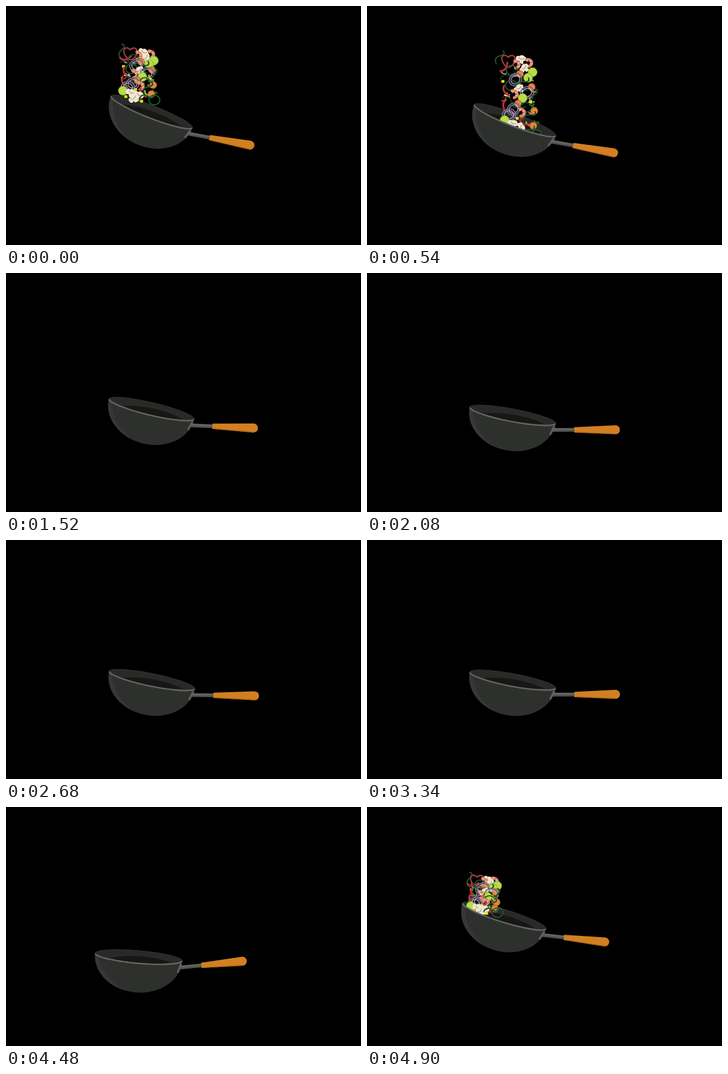
Write an HTML page that moves like this. It is 640 by 432 pixels and loops after 4920 ms.

```html
<!DOCTYPE html>
<html lang="en">
<head>
<meta charset="utf-8">
<title>Wok toss</title>
<style>
  html, body { margin: 0; height: 100%; overflow: hidden; background: #000; }
  svg { display: block; width: 100vw; height: 100vh; }
</style>
</head>
<body>
<svg viewBox="0 0 640 432" fill="none" stroke-linecap="round" stroke-linejoin="round">
  <defs>
    <clipPath id="aboveRim"><path id="clip" d="M-300-400H450V0H158A79 12 0 0 1 0 0H-300Z"/></clipPath>
    <clipPath id="bowlClip"><path d="M0 0A79 12 0 0 0 158 0A79 64 0 0 1 0 0Z"/></clipPath>
  </defs>
  <g id="back">
    <ellipse cx="79" rx="79" ry="12" fill="#282a28" stroke="#353633" stroke-width="1"/>
    <path d="M26 6Q80-9 138 4Q84 17 26 6Z" fill="#191616"/>
  </g>
  <g clip-path="url(#aboveRim)"><g id="food"></g></g>
  <g id="front">
    <g clip-path="url(#bowlClip)">
      <path d="M0 0A79 12 0 0 0 158 0A79 64 0 0 1 0 0Z" fill="#2e302e"/>
      <path d="M-1 0A80 65 0 0 0 62 63Q18 46 6 4Z" fill="#373638"/>
    </g>
    <path d="M1 1A79 12 0 0 0 157 1" stroke="#656565" stroke-width="2.6"/>
    <path d="M156 6L152 20" stroke="#5a5a58" stroke-width="4"/>
    <g transform="translate(193 4.8) rotate(-10.8)">
      <path d="M-40-3.3H1V3.3H-40Z" fill="#62625f"/>
      <path d="M-38 1.6H0" stroke="#484846" stroke-width="1.5"/>
      <path d="M0-4.8L74-8.2A8.2 8.2 0 0 1 74 8.2L0 4.8Z" fill="#d27f22"/>
      <path d="M3 4.2L75 7.2" stroke="#ab651b" stroke-width="1.4"/>
    </g>
  </g>
</svg>
<script>
const LOOP = 4920, LAST = 105;
const byId = id => document.getElementById(id);

// Key poses of the wok: step, left rim x, left rim y, tilt in degrees
const poses = [
  [0, 189, 163, 21.4], [4, 191, 168, 24], [11, 193, 178.5, 21], [22, 189, 209, 16.4],
  [44, 185, 243, 10.7], [71, 185, 239, 10.6], [85, 181, 304, -3.3],
  [89, 177, 313, -5.4], [94, 164, 281, 1.5], [100, 158, 228, 12], [105, 172, 174, 17.2]
];

function slope(i, c) {
  const a = poses[Math.max(i - 1, 0)], b = poses[Math.min(i + 1, poses.length - 1)];
  return (b[c] - a[c]) / (b[0] - a[0]);
}

// Smooth curve through the key poses, plus a fading shake as the food lands
function wokAt(n) {
  let i = 0;
  while (i < poses.length - 2 && n > poses[i + 1][0]) i++;
  const a = poses[i], b = poses[i + 1], h = b[0] - a[0], u = (n - a[0]) / h;
  const [x, y, tilt] = [1, 2, 3].map(c => {
    const u2 = u * u, u3 = u2 * u;
    return a[c] * (2 * u3 - 3 * u2 + 1) + b[c] * (3 * u2 - 2 * u3)
      + h * (slope(i, c) * (u3 - 2 * u2 + u) + slope(i + 1, c) * (u3 - u2));
  });
  const since = Math.max(0, n - 11);
  return [x + 7 * Math.exp(-since / 20) * Math.sin(since / 11 * 2 * Math.PI), y, tilt];
}

const line = (d, color, w) => `<path d="${d}" stroke="${color}" stroke-width="${w}"/>`;
const disc = (r, fill, edge) => `<circle r="${r}" fill="${fill}" stroke="${edge}" stroke-width="1.2"/>`;
const hoop = (r, color, w) => `<ellipse rx="${r}" ry="${r * 0.87}" stroke="${color}" stroke-width="${w}"/>`;
const art = {
  leaf: line('M-9 10Q-12-2 0-3T7-11', '#175424', 2.4),
  strip: line('M-14 5Q-6-6 2 0T15-7', '#2a3c1e', 1.5),
  ring: hoop(10, '#1f5a2c', 2),
  pepper: line('M0 11C-8 10-16-6-9-10C-5-12-2-9 0-7C4-12 12-11 12-4C12 3 7 10 0 11Z', '#a83a44', 2.4),
  red: line('M-8-6Q-8 5 8 6', '#bf2f30', 3.2),
  carrot: disc(6.2, '#e2863c', '#bf6628'),
  cuke: disc(8, '#b9dc48', '#86b83a'),
  shrimp: line('M-6-5C4-9 9 1 1 6', '#e37f68', 5.4) + line('M-4-6L-4-2M3-5L1-2M6 1L2 1', '#f3bfa8', 1.5),
  onion: hoop(12, '#77688f', 2.2) + hoop(8.4, '#b9aec4', 1.5),
  cream: '<path d="M-9 2Q-11-6-4-5Q0-10 6-6Q11-5 8 1L5 2L6 8L-1 7L-2 3Q-6 7-9 2Z" fill="#efe8d2"/>' + line('M-4-2Q1 2 5-3', '#b98f80', 1.3),
  cube: '<rect x="-2.8" y="-2.5" width="5.6" height="5" rx="1" fill="#e3e01e"/>'
};

// Pieces of the tossed column, from its top to its bottom
const column = ('leaf cream pepper shrimp shrimp red cream ring cuke carrot strip cuke onion cube leaf '
  + 'ring carrot cream red onion shrimp leaf cuke strip cube carrot red ring onion carrot shrimp onion '
  + 'leaf cube cuke red cream carrot cream cube leaf cream ring cube').split(' ');

let seed = 11;
const rnd = () => (seed = seed * 16807 % 2147483647) / 2147483647;
const food = [];

// dx, dy: place in the column, from its middle and from its top
function add(html, dx, dy, upright) {
  const el = document.createElementNS('http://www.w3.org/2000/svg', 'g');
  el.innerHTML = html;
  byId('food').append(el);
  food.push({ el, dx, dy, turn: upright ? 0 : rnd() * 90 - 45, spin: upright ? 0 : rnd() * 8 - 4 });
}

const scraps = ['#b5343a', '#23642c', '#de8468', '#a5cc44', '#8d7fa3', '#1b4a26', '#ece2c8'];
for (let i = 0; i < 28; i++)
  add(line('M-4-2Q0 3 4 1', scraps[i % scraps.length], 2.6), (rnd() - 0.5) * 56, 14 + rnd() * 76);
column.forEach((kind, i) => {
  const spread = (i * 0.618) % 1 * 2 - 1;
  add(art[kind], 30 * spread, 90 * i / (column.length - 1), kind === 'pepper' || kind === 'cube');
});

const [endX, endY] = wokAt(LAST);

function placeFood(n, wx, wy) {
  const rising = n >= 95, shown = rising || n <= 32;
  byId('food').style.display = shown ? '' : 'none';
  if (!shown) return;
  const left = LAST - n;
  for (const f of food) {
    let x, y;
    if (rising) {
      x = 212 + f.dx * 0.85 + wx - endX;
      y = 131 + f.dy * 0.68 + wy - endY + left * 7;
    } else {
      // Ballistic flight; the column stretches as it falls
      x = 240 + f.dx + n * (2.75 + f.dy * 0.009);
      y = 82 + f.dy + n * (1 + f.dy * 0.054) - 0.42 * n * (11 - n);
    }
    const angle = f.turn + f.spin * (rising ? -1 - left : n);
    f.el.setAttribute('transform', `translate(${x.toFixed(2)} ${y.toFixed(2)}) rotate(${angle.toFixed(1)})`);
  }
}

// Three steps every 140 ms, the middle one held for 100 ms
function stepAt(t) {
  const r = t % 140;
  return Math.floor(t / 140) * 3 + (r >= 120 ? 2 : r >= 20 ? 1 : 0);
}

function draw(t) {
  const n = stepAt(t), [x, y, tilt] = wokAt(n);
  const move = `translate(${x.toFixed(2)} ${y.toFixed(2)}) rotate(${tilt.toFixed(2)})`;
  for (const id of ['back', 'front', 'clip']) byId(id).setAttribute('transform', move);
  placeFood(n, x, y);
}

const start = performance.now();
function tick() {
  draw((performance.now() - start) % LOOP);
  requestAnimationFrame(tick);
}
tick();
</script>
</body>
</html>
```
